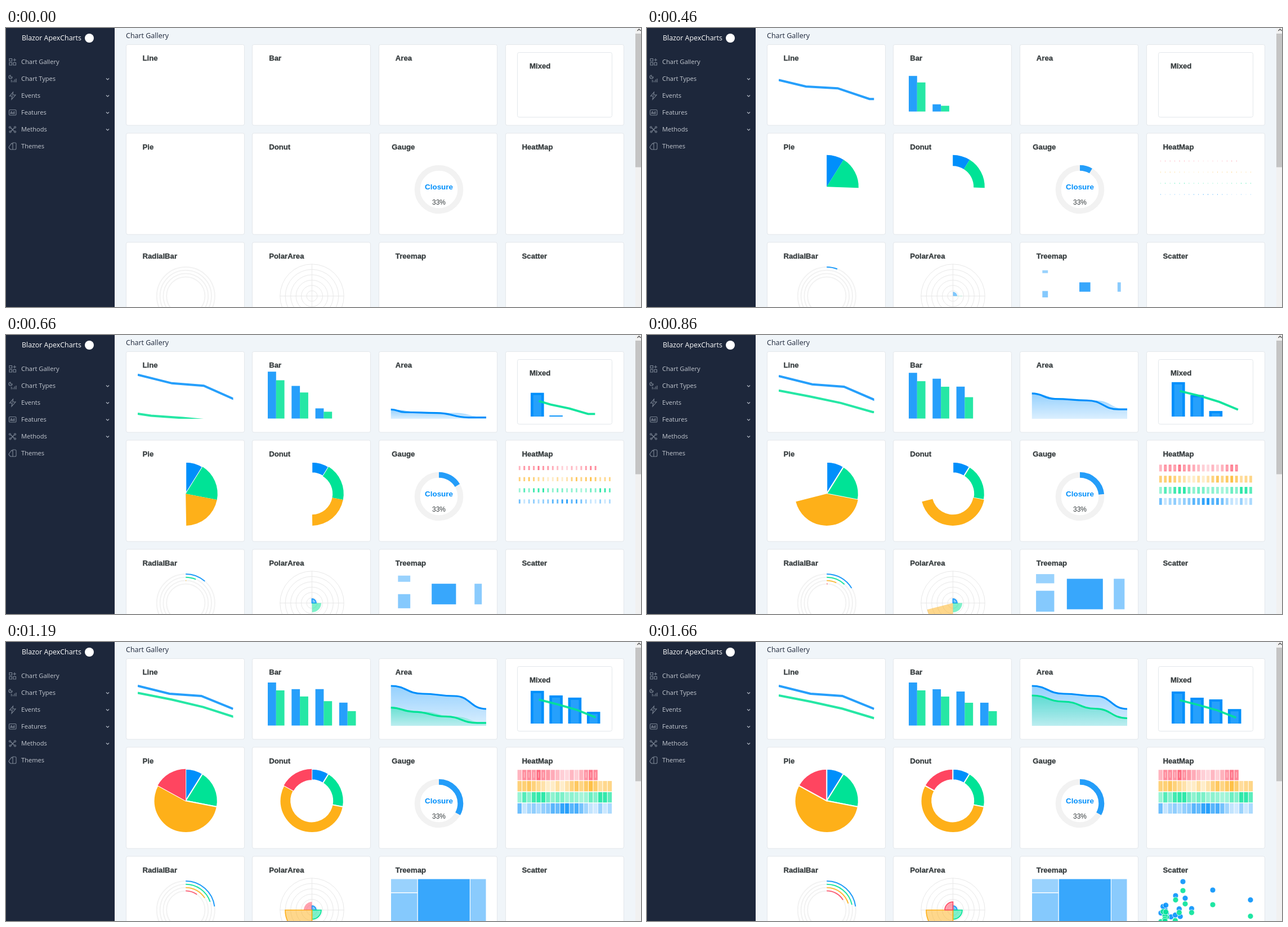
An HTML page with a canvas that plays this animation: 1128 by 496 pixels, repeating every 2.39 s.

```html
<!DOCTYPE html>
<html lang="en">
<head>
<meta charset="utf-8">
<title>Chart Gallery</title>
<style>
  html, body { margin: 0; width: 100%; height: 100%; overflow: hidden; background: #f0f5f9; }
  svg, canvas { position: absolute; left: 0; top: 0; width: 1128px; height: 496px; }
  .ui { font-family: "Open Sans", "Noto Sans", sans-serif; }
  .chart { font-family: "Liberation Sans", Arial, sans-serif; }
  .title { font-size: 13.2px; font-weight: 700; fill: #373d3f; stroke: #373d3f; stroke-width: .3; }
  .menu { font-size: 11.1px; fill: #c3c8d0; }
  .icon { fill: none; stroke: #7d8796; stroke-width: 1.1; }
  .card { fill: #fff; stroke: #e3e7eb; }
  .ring { fill: none; stroke: #e8e8e8; }
  .track { fill: none; stroke: #f2f2f2; }
</style>
</head>
<body>
<svg viewBox="0 0 1128 496">
  <rect width="1128" height="496" fill="#f0f5f9"/>
  <rect width="193" height="496" fill="#1d273b"/>
  <g class="ui">
    <text x="28" y="22" font-size="12.4" fill="#fff">Blazor ApexCharts</text>
    <text x="213" y="18" font-size="12.5" fill="#1d273b">Chart Gallery</text>
  </g>
  <circle cx="148" cy="18" r="8" fill="#fff"/>
  <g id="menu" class="ui"></g>
  <g class="icon">
    <path d="M6 54.5h4.500v4.500h-4.500zM6 61.500h4.500v4.500h-4.500zM13 61.500h4.500v4.500h-4.500zM15.200 54v5.500M12.500 56.700h5.500"/>
    <path d="M8 84a3 3 0 1 0 3 3h-3zM9.500 92v4.500M12.500 93.500v3M15.500 91.500v5M18 90v6.500"/>
    <path d="M12.500 114l-6 7h4.500l-1 6 7-8h-5z"/>
    <rect x="5.5" y="145.5" width="12.5" height="9.5" rx="1.5"/>
    <path d="M8.500 177.500l6 6M14.500 178l-6 6"/>
    <circle cx="7" cy="176.5" r="1.5"/><circle cx="16" cy="176.5" r="1.5"/>
    <circle cx="7.5" cy="184.5" r="1.5"/><circle cx="16" cy="184.5" r="1.5"/>
    <path d="M12 204h4a2 2 0 0 1 2 2v8a2 2 0 0 1-2 2h-4zM12 206.500l-2-1.500-4 5a3 3 0 0 0 0 4l2 2h4"/>
  </g>
  <text class="ui" x="7.3" y="152.8" font-size="6.5" font-weight="700" fill="#8b94a2">Ad</text>
  <rect x="1118" width="10" height="496" fill="#f1f1f1"/>
  <rect x="1118" y="10" width="10" height="237.5" fill="#c4c4c4"/>
  <path d="M1121.500 5l3-3 3 3" fill="none" stroke="#505050" stroke-width="1.3"/>
  <g id="cards"></g>
  <rect class="card" x="908.5" y="43.5" width="168" height="115" rx="3"/>
  <circle class="track" cx="769" cy="287" r="38.3" stroke-width="10"/>
  <g id="rings"></g>
  <g id="titles" class="chart title"></g>
  <g class="chart" text-anchor="middle">
    <text x="769" y="287" font-size="13.4" font-weight="700" fill="#008ffb">Closure</text>
    <text x="769" y="314" font-size="12" fill="#373d3f">33%</text>
  </g>
</svg>
<canvas id="charts" width="1128" height="496"></canvas>
<script>
const fill = (id, parts) => { document.getElementById(id).innerHTML = parts.join(''); };
const column = i => 213.5 + i * 224.67;
const radialRadius = i => 51.5 - i * 5.8;

fill('menu', ['Chart Gallery', 'Chart Types', 'Events', 'Features', 'Methods', 'Themes'].map((name, i) => {
  const y = 60 + i * 30;
  const chevron = i > 0 && i < 5
    ? `<path d="M178 ${y - .5}l2.5 2.5 2.5-2.5" fill="none" stroke="#aeb5c0" stroke-width="1.2"/>` : '';
  return `<text class="menu" x="27" y="${y + 4.3}">${name}</text>${chevron}`;
}));

fill('cards', [[29.5, 143.5], [187, 180], [381, 200]].flatMap(([y, h]) => [0, 1, 2, 3].map(i =>
  `<rect class="card" x="${Math.round(column(i)) - .5}" y="${y}" width="210" height="${h}" rx="3"/>`)));

const nudge = { Mixed: [13.5, 14], Gauge: [-6.5, 0] };
fill('titles', [
  ['Line', 'Bar', 'Area', 'Mixed'],
  ['Pie', 'Donut', 'Gauge', 'HeatMap'],
  ['RadialBar', 'PolarArea', 'Treemap', 'Scatter']
].flatMap((names, row) => names.map((name, i) => {
  const [dx, dy] = nudge[name] || [0, 0];
  return `<text x="${column(i) + 29 + dx}" y="${[58, 215.5, 410][row] + dy}">${name}</text>`;
})));

fill('rings', [
  ...[0, 1, 2, 3].map(i =>
    `<circle class="track" cx="319.3" cy="476.5" r="${radialRadius(i)}" stroke-width="2"/>`),
  ...[1, 2, 3, 4, 5, 6].map(i => `<circle class="ring" cx="543.5" cy="476.5" r="${i * 9.45}"/>`),
  '<path class="ring" d="M486.5 476.5h114M543.5 419.5v114"/>'
]);

// The picture only changes at these moments and is held in between.
const LOOP = 2390;
const HOLDS = [0, 200, 330, 460, 590, 660, 860, 990, 1190, 1250, 1320, 1390, 1460, 1520, 1590, 1660];
const BLUE = '0,143,251', GREEN = '0,227,150', ORANGE = '254,176,25', RED = '255,69,96';
const COLORS = [BLUE, GREEN, ORANGE, RED];
const rgba = (rgb, a = 1) => `rgba(${rgb},${a})`;
const rad = deg => (deg - 90) * Math.PI / 180;
const g = document.getElementById('charts').getContext('2d');

const progress = (t, start, length) => Math.min(1, Math.max(0, (t - start) / length));

// Nearly linear, a little slower towards the end.
function soft(t, start, length) {
  const x = progress(t, start, length);
  return x * (1.3 - .3 * x);
}

// Overshoots by a tenth, then settles.
function back(t, start) {
  const u = progress(t, start, 800) - 1;
  return 1 + 2.70158 * u ** 3 + 1.70158 * u ** 2;
}

function seeded(seed) {
  return () => {
    seed = (seed * 16807) % 2147483647;
    return seed / 2147483647;
  };
}

function clipped(x, y, w, h, draw) {
  g.save();
  g.beginPath();
  g.rect(x, y, w, h);
  g.clip();
  draw();
  g.restore();
}

// Raises a line from below its base; all points but the first also slide in.
function raise(points, base, k, slide = 48) {
  const floor = base + 12, dx = slide * (k - 1);
  const out = points.map(([x, y], i) => [i ? x + dx : x, floor - k * (floor - y)]);
  if (dx < 0) out.push([points[points.length - 1][0], out[out.length - 1][1]]);
  return out;
}

function trace(points, smooth) {
  g.beginPath();
  points.forEach(([x, y], i) => {
    if (!i) return g.moveTo(x, y);
    const [px, py] = points[i - 1], mid = (px + x) / 2;
    smooth ? g.bezierCurveTo(mid, py, mid, y, x, y) : g.lineTo(x, y);
  });
}

function strokeLine(points, color, width, smooth) {
  trace(points, smooth);
  g.strokeStyle = color;
  g.lineWidth = width;
  g.stroke();
}

const spread = (x, step, ys) => ys.map((y, i) => [x + i * step, y]);
const trends = [[78, 92, 96, 119], [95, 106, 118.5, 135.5]];

function drawLine(t) {
  clipped(234, 66, 169.5, 83, () => trends.forEach((ys, i) =>
    strokeLine(raise(spread(234, 56.5, ys), 149, back(t, 256 + i * 344)), rgba(COLORS[i], .85), 4)));
}

function drawArea(t) {
  clipped(683.5, 66, 169.5, 83, () => trends.forEach((ys, i) => {
    const points = spread(683.5, 56.5, ys), k = soft(t, 490 + i * 340, 600);
    const body = raise(points, 149, k, 0);
    const shade = g.createLinearGradient(0, body[0][1], 0, 149);
    shade.addColorStop(0, rgba(COLORS[i], .42));
    shade.addColorStop(1, rgba(COLORS[i], .14));
    trace([...body], true);
    g.lineTo(853, 170);
    g.lineTo(683.5, 170);
    g.fillStyle = shade;
    g.fill();
    strokeLine(raise(points, 149, k), rgba(COLORS[i]), 3.2, true);
  }));
}

function drawBars(t) {
  [256, 424, 604, 890].forEach((start, i) => {
    const k = back(t, start);
    [[76.5, 64.5, 60.5, 40.5], [62.5, 51.5, 40.5, 25.5]].forEach((heights, s) => {
      const h = heights[i] * k;
      g.fillStyle = rgba(COLORS[s], .85);
      g.fillRect(465 + i * 42.3 + s * 14.8, 148.5 - h, 14.8, h);
    });
  });
}

function drawMixed(t) {
  clipped(912, 66, 161, 79, () => {
    [57, 46, 43, 25].forEach((height, i) => {
      const h = height * back(t, 488 + i * 165), x = 932 + i * 33.3;
      g.fillStyle = rgba(BLUE);
      g.fillRect(x, 145 - h, 23.6, h);
      g.fillStyle = '#26a0fc';
      g.fillRect(x + 4.6, 149 - h, 14.4, Math.max(0, h - 4));
    });
    strokeLine(raise(spread(946.5, 33.3, [103.5, 112, 121.5, 134.5]), 145, back(t, 488)), rgba(GREEN, .92), 3.8);
  });
}

const sweep = t => 360 * soft(t, 270, 920);

function wedge(x, y, inner, outer, from, to) {
  g.beginPath();
  g.arc(x, y, outer, rad(from), rad(to));
  inner ? g.arc(x, y, inner, rad(to), rad(from), true) : g.lineTo(x, y);
  g.closePath();
}

// A slice gets its outline a moment after it is complete.
function drawSlices(t, x, y, inner, ends, radii, alpha, outline) {
  ends.forEach((end, i) => {
    const from = i ? ends[i - 1] : 0, to = Math.min(end, sweep(t));
    if (to <= from) return;
    wedge(x, y, inner, radii[i], from, to);
    g.fillStyle = rgba(COLORS[i], alpha);
    g.fill();
    if (sweep(t - 200) < end) return;
    g.strokeStyle = outline || rgba(COLORS[i]);
    g.lineWidth = outline ? 2 : 1.6;
    g.stroke();
  });
}

function drawRound(t) {
  const shares = [32, 101, 298.7, 360], full = Array(4).fill(56.6);
  drawSlices(t, 319.2, 282.3, 0, shares, full, 1, '#fff');
  drawSlices(t, 543.2, 282.3, 37, shares, full, 1, '#fff');
  drawSlices(t, 543.5, 476.5, 0, [90, 180, 270, 360], [7.5, 16.5, 47.5, 14.5], .5);
}

function arcBar(x, y, r, width, degrees, color) {
  if (degrees <= 0) return;
  g.beginPath();
  g.arc(x, y, r, rad(0), rad(degrees));
  g.strokeStyle = color;
  g.lineWidth = width;
  g.stroke();
}

function drawRadial(t) {
  arcBar(769, 287, 38.3, 10, sweep(t) * .33, rgba(BLUE, .85));
  [83, 78, 73, 58].forEach((end, i) => {
    const degrees = end * soft(t, 270 + i * 190, 920 - i * 90);
    arcBar(319.3, 476.5, radialRadius(i), 1.9, degrees, rgba(COLORS[i], .88));
  });
}

function centered(x, y, w, h, scale) {
  g.fillRect(x + w * (1 - scale) / 2, y + h * (1 - scale) / 2, w * scale, h * scale);
}

// Each row is strongest around its peak column, with some noise.
function drawHeat(t) {
  const k = soft(t, 400, 790), random = seeded(11);
  [[RED, 3], [ORANGE, 14], [GREEN, 4], [BLUE, 10]].forEach(([color, peak], row) => {
    for (let i = 0; i < (row ? 20 : 17); i++) {
      const alpha = .5 + .2 * Math.cos((i - peak) * Math.PI / 7) + .3 * (random() - .5);
      const x = 908.6 + i * 8.43, y = 227.3 + row * 19.8;
      g.fillStyle = rgba(color, alpha);
      centered(x, y, 7.4, 18.4, k);
      if (row === 0 && alpha > .55) {
        g.fillStyle = 'rgba(255,255,255,.3)';
        centered(x + 2.7, y + 4, 2, 10, k);
      }
    }
  });
}

function drawTree(t) {
  const k = soft(t, 310, 880);
  [[684, 421.5, 46.5, 23.5, .4], [684, 446.5, 46.5, 53.5, .48],
    [731.8, 421.5, 92, 78, .78], [825, 421.5, 27.5, 78, .46]].forEach(([x, y, w, h, alpha]) => {
    g.fillStyle = rgba(BLUE, alpha);
    centered(x, y, w, h, k);
  });
}

// Pairs of a blue dot and a green one some way below it.
const scatterRandom = seeded(5);
const pairs = [[952, 426, 16], [1005, 441, 26], [1072, 458.5, 29], [939, 451, 7.5], [956, 455.5, 10]];
for (let i = 0; i < 12; i++) {
  pairs.push([913 + 62 * scatterRandom() ** 1.5, 466 + 24 * scatterRandom(), 6 + 12 * scatterRandom()]);
}

function drawScatter(t) {
  const k = progress(t, 1190, 200);
  if (!k) return;
  [BLUE, GREEN].forEach((color, s) => pairs.forEach(([x, y, drop]) => {
    g.beginPath();
    g.arc(x, y + s * drop, 5 * k, 0, 7);
    g.fillStyle = rgba(color, .88);
    g.fill();
    g.strokeStyle = '#fff';
    g.lineWidth = .8;
    g.stroke();
  }));
}

const charts = [drawLine, drawBars, drawArea, drawMixed, drawRound, drawRadial, drawHeat, drawTree, drawScatter];
const start = performance.now();
let shown = -1;

function tick() {
  const now = (performance.now() - start) % LOOP;
  const t = HOLDS.filter(h => h <= now).pop();
  if (t !== shown) {
    shown = t;
    g.clearRect(0, 0, 1128, 496);
    charts.forEach(draw => draw(t));
  }
  requestAnimationFrame(tick);
}
tick();
</script>
</body>
</html>
```
